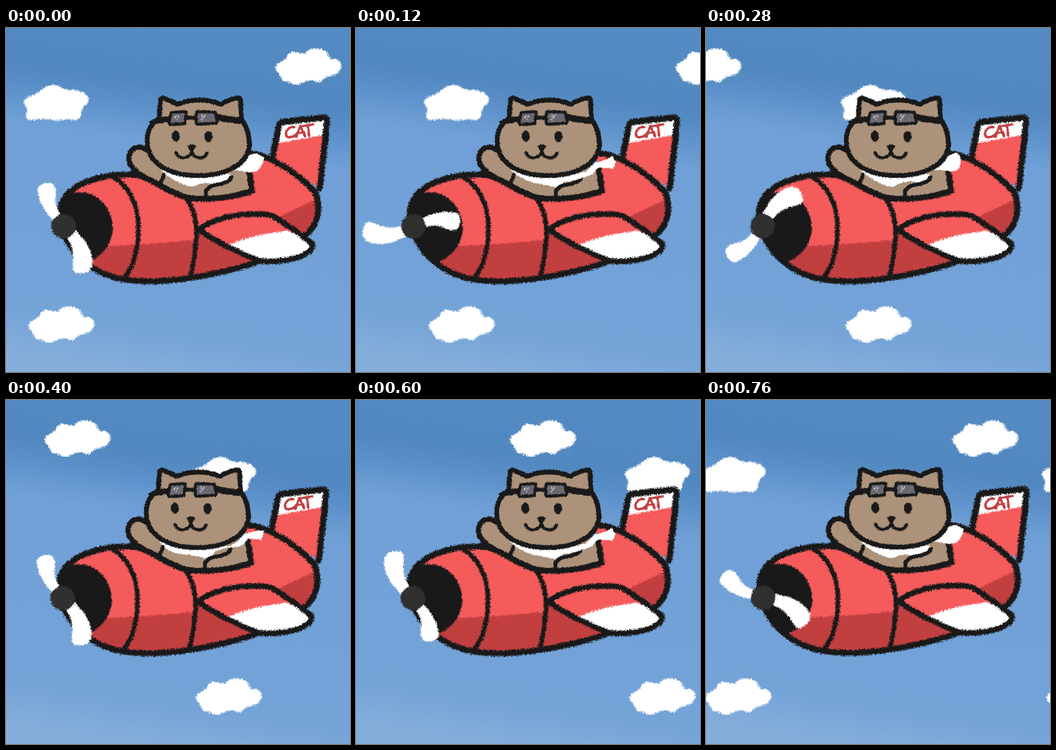
Write an HTML page with a canvas that moves like this. It is 748 by 748 pixels and loops after 0.8 s.

```html
<!DOCTYPE html>
<html lang="en">
<head>
<meta charset="utf-8">
<title>Cat pilot</title>
<style>
html, body { margin: 0; width: 100%; height: 100%; overflow: hidden; background: #70a0d7; }
canvas { display: block; }
</style>
</head>
<body>
<canvas id="stage" width="748" height="748"></canvas>
<script>
const SIZE = 748, STEP = 40, STEPS = 20;
const INK = '#191919', RED = '#f55b5b', DARK_RED = '#c23f40', FUR = '#ac927a', WHITE = '#fff';
const stage = document.getElementById('stage').getContext('2d');

function hash(x, y) {
  let h = Math.imul(x + 17, 374761393) ^ Math.imul(y + 71, 668265263);
  h = Math.imul(h ^ (h >>> 13), 1274126177);
  return ((h ^ (h >>> 16)) >>> 0) / 4294967296;
}

// Scatters pixels by up to amp so that edges look like crayon.
function roughen(ctx, amp) {
  const { width: w, height: h } = ctx.canvas;
  const image = ctx.getImageData(0, 0, w, h);
  const out = new Uint32Array(image.data.buffer);
  const src = out.slice();
  for (let y = 0; y < h; y++) {
    for (let x = 0; x < w; x++) {
      const gx = x * 0.7 | 0, gy = y * 0.7 | 0;
      const sx = Math.round(x + (hash(gx, gy) * 2 - 1) * amp);
      const sy = Math.round(y + (hash(gx + 999, gy) * 2 - 1) * amp);
      const inside = sx >= 0 && sy >= 0 && sx < w && sy < h;
      out[y * w + x] = inside ? src[sy * w + sx] : 0;
    }
  }
  ctx.putImageData(image, 0, 0);
}

function layer(w, h, amp, draw) {
  const canvas = document.createElement('canvas');
  canvas.width = w;
  canvas.height = h;
  const ctx = canvas.getContext('2d', { willReadFrequently: true });
  ctx.lineCap = ctx.lineJoin = 'round';
  draw(ctx);
  roughen(ctx, amp);
  return canvas;
}

function fill(ctx, d, color) {
  ctx.fillStyle = color;
  ctx.fill(new Path2D(d));
}

function line(ctx, d, width, color = INK) {
  ctx.strokeStyle = color;
  ctx.lineWidth = width;
  ctx.stroke(new Path2D(d));
}

function clipped(ctx, d, draw) {
  ctx.save();
  ctx.clip(new Path2D(d));
  draw();
  ctx.restore();
}

function oval(ctx, x, y, rx, ry, color = INK) {
  ctx.fillStyle = color;
  ctx.beginPath();
  ctx.ellipse(x, y, rx, ry, 0, 0, Math.PI * 2);
  ctx.fill();
}

// Closed smooth curve through the midpoints of a flat x, y list.
function blob(ctx, xy, dx, dy) {
  const n = xy.length / 2;
  const at = i => [xy[i % n * 2] + dx, xy[i % n * 2 + 1] + dy];
  const mid = i => {
    const [a, b] = [at(i), at(i + 1)];
    return [(a[0] + b[0]) / 2, (a[1] + b[1]) / 2];
  };
  ctx.beginPath();
  ctx.moveTo(...mid(0));
  for (let i = 1; i <= n; i++) ctx.quadraticCurveTo(...at(i), ...mid(i));
  ctx.fillStyle = WHITE;
  ctx.fill();
}

const PUFFY = [-2, 44, 6, 28, 20, 24, 30, 6, 48, 6, 62, 12, 72, -1, 100, -2, 114, 8, 116, 20, 137, 22,
  145, 36, 135, 56, 108, 60, 98, 74, 74, 66, 48, 79, 30, 73, 12, 66, 8, 52];
const FLAT = [-2, 38, 6, 25, 30, 19, 42, 5, 72, -3, 90, 12, 112, 10, 137, 19, 143, 36, 126, 50, 124, 69,
  116, 78, 94, 73, 72, 78, 40, 73, 7, 78, 3, 66, 8, 52];
const PAD = 8;
const cloudLayer = shape => layer(160, 96, 2.4, ctx => blob(ctx, shape, PAD, PAD));
const puffy = cloudLayer(PUFFY), flat = cloudLayer(FLAT);
const clouds = [[puffy, 586, 46], [flat, 39, 124], [puffy, 49, 607]];

const TAIL = 'M580 280 L593 212 Q595 206 603 204 L689 195 Q699 195 698 206 L682 349';
const COCKPIT = 'C310 313 340 357 402 370 C445 374 495 368 535 354 L527 307';
const HULL = 'M518 271 C575 272 640 323 668 352 C681 368 682 400 674 418 C668 434 660 443 652 450 ' +
  'L547 508 C500 526 400 549 320 551 C295 551 270 549 252 546 C200 536 160 506 138 472 ' +
  'C122 446 114 418 118 395 C122 350 185 319 262 319 ' + COCKPIT;
const WING = 'M420 438 C450 415 500 404 530 405 C550 404 572 404 582 410 C615 430 650 455 666 470 ' +
  'C670 480 655 490 640 497 C610 508 570 509 550 506 C510 490 450 462 420 438 Z';

const plane = layer(SIZE, SIZE, 2.4, ctx => {
  fill(ctx, TAIL, RED);
  clipped(ctx, TAIL, () => fill(ctx, 'M575 253 L720 228 V180 H575 Z', WHITE));
  line(ctx, TAIL, 13.5);
  fill(ctx, HULL, RED);
  clipped(ctx, HULL, () => {
    fill(ctx, 'M100 482 L228 474 L330 468 L411 461 L420 440 L597 409 L700 359 V600 H100 Z', DARK_RED);
    fill(ctx, 'M100 360 L148 358 C192 351 232 385 232 436 C230 475 205 500 176 509 L100 520 Z', INK);
    line(ctx, 'M234 324 C275 350 288 395 288 435 C288 480 278 515 260 540', 10);
    line(ctx, 'M394 372 C412 400 417 440 413 465 C411 500 405 525 400 542', 10);
  });
  line(ctx, HULL, 13);
  fill(ctx, WING, RED);
  clipped(ctx, WING, () => fill(ctx, 'M484 471 Q540 448 612 441 L690 470 V530 H530 Z', WHITE));
  line(ctx, WING, 12);
});

const lettering = layer(SIZE, SIZE, 0.8, ctx => {
  line(ctx, 'M627 216 C616 213 607 224 609 232 C611 240 622 238 630 232 ' +
    'M631 237 L640 213 L650 235 M633 228 L648 227 M645 213 L667 210 M657 212 L659 234', 5.2, DARK_RED);
});

// Four poses of the scarf: the part round the neck and the loose end.
const scarves = [
  ['M335 306 Q352 326 384 339 Q402 348 412 343 Q430 334 445 339 Q470 342 481 334 L488 318 Z',
    'M496 308 Q520 298 526 280 Q534 271 546 273 L562 282 Q558 302 546 311 Q535 316 520 313 Z'],
  ['M335 306 Q352 326 385 336 Q405 340 432 346 Q442 345 452 334 L490 318 Z',
    'M440 333 L460 324 L500 312 L521 292 Q540 288 548 285 L557 278 L565 291 L559 307 Q545 303 526 304 L514 318 Q490 329 455 335 Z'],
  ['M335 306 Q352 324 384 339 Q403 349 414 343 Q428 333 448 333 Q468 339 481 334 L488 318 Z',
    'M496 308 Q520 298 526 281 Q536 272 545 271 Q556 274 556 285 Q557 304 547 310 Q530 313 512 309 Z'],
  ['M335 306 Q350 329 376 334 Q410 337 440 345 Q448 343 457 329 L490 318 Z',
    'M484 321 L505 308 L521 291 Q540 285 564 283 L557 304 Q540 302 528 301 Q518 318 504 320 Z']
];

const HEAD = 'M333 196 L336 157 Q338 151 345 153 L373 166 Q420 147 467 166 Q485 155 503 152 ' +
  'Q510 151 510 160 L512 200 C525 215 529 235 529 255 C527 295 480 321 418 321 ' +
  'C355 321 307 295 307 245 C307 225 315 207 333 196 Z';

function drawBody(ctx, [collar, flap]) {
  const arm = 'M306 266 C292 252 267 260 267 283 C267 300 280 310 296 321';
  fill(ctx, arm + ' L330 339 Q365 362 402 370 C445 374 495 368 535 354 L525 300 L320 280 Z', FUR);
  line(ctx, arm, 11);
  line(ctx, 'M262 319 ' + COCKPIT, 12);
  fill(ctx, collar, WHITE);
  line(ctx, 'M343 320 Q341 329 335 337', 8);
  line(ctx, 'M434 365 C433 347 446 342 461 340 C476 338 486 333 490 325', 8.5);
  fill(ctx, flap, WHITE);
}

function drawGoggles(ctx) {
  line(ctx, 'M318 206 Q332 200 354 198', 12.5);
  line(ctx, 'M458 194 Q485 199 512 202', 14);
  line(ctx, 'M392 195 H414', 9);
  const lenses = ['M361 187 L389 185 L386 205 L358 207 Z', 'M417 185 L452 186 L456 204 L417 206 Z'];
  for (const lens of lenses) {
    line(ctx, lens, 13);
    fill(ctx, lens, '#6b6a73');
  }
  line(ctx, 'M366 196 L370 190 M371 199 L376 190 M425 200 L433 189 M424 194 L427 189', 1.6, '#e4e4e8');
}

function drawHead(ctx) {
  fill(ctx, HEAD, FUR);
  line(ctx, HEAD, 10.5);
  drawGoggles(ctx);
  oval(ctx, 369, 235, 9, 11.5);
  oval(ctx, 440, 236, 9, 11.5);
  fill(ctx, 'M395 258 Q396 253 404 253 Q412 253 413 258 Q411 265 404 268 Q397 265 395 258 Z', INK);
  line(ctx, 'M404 262 V270 M370 271 C374 286 397 286 404 270 C411 286 434 286 437 272', 7);
}

const cats = scarves.map(scarf => layer(SIZE, SIZE, 1.3, ctx => {
  drawBody(ctx, scarf);
  drawHead(ctx);
}));

const HUB = { x: 125, y: 431, r: 26.5 };
const PROP = 240;
const propeller = layer(PROP, PROP, 2, ctx => {
  ctx.translate(PROP / 2 - HUB.x, PROP / 2 - HUB.y);
  fill(ctx, 'M127 442 L135 460 Q149 482 146 506 Q143 527 150 532 Q162 536 178 530 ' +
    'Q190 521 188 504 Q184 480 173 465 L152 440 Z', WHITE);
  fill(ctx, 'M120 420 L118 404 Q106 388 108 368 Q111 346 102 339 Q90 334 76 341 ' +
    'Q66 348 70 360 Q73 380 84 394 L100 418 Z', WHITE);
  oval(ctx, HUB.x, HUB.y, HUB.r, HUB.r, '#303030');
});

function paintSky() {
  const sky = stage.createLinearGradient(429, 0, 319, SIZE);
  const stops = [[0, '#548ac2'], [0.18, '#5288c0'], [0.24, '#5a8fc8'], [0.29, '#6698d0'],
    [0.35, '#70a0d7'], [0.88, '#74a3d8'], [1, '#84adda']];
  for (const [at, color] of stops) sky.addColorStop(at, color);
  stage.fillStyle = sky;
  stage.fillRect(0, 0, SIZE, SIZE);
}

// Small sway of the whole plane: step, x, y.
const sway = [[0, 0, 0], [3, 0, 0], [7, -2, 0], [10, -2, 0], [13, -1, -2], [15, -1, 0], [19, -1, -1], [20, 0, 0]];
function swayAt(step) {
  const i = sway.findIndex(key => key[0] > step);
  const [a, b] = [sway[i - 1], sway[i]];
  const f = (step - a[0]) / (b[0] - a[0]);
  return [1, 2].map(j => Math.round(a[j] + (b[j] - a[j]) * f));
}

function render(step) {
  paintSky();
  for (const [image, x, y] of clouds) {
    stage.drawImage(image, x - PAD + 36.4 * step, y - PAD);
    if (step) stage.drawImage(image, x - PAD - 50.2 * (STEPS - step), y - PAD);
  }
  const pose = Math.round(step / STEPS * 6) % 6;
  stage.save();
  stage.translate(...swayAt(step));
  stage.drawImage(plane, 0, 0);
  stage.drawImage(lettering, 0, 0);
  stage.drawImage(cats[pose > 3 ? 6 - pose : pose], 0, 0);
  stage.translate(HUB.x, HUB.y);
  stage.rotate(step * Math.PI / 5);
  stage.drawImage(propeller, -PROP / 2, -PROP / 2);
  stage.restore();
}

const start = performance.now();
function tick(now) {
  render(Math.floor(Math.max(0, now - start) / STEP) % STEPS);
  requestAnimationFrame(tick);
}
render(0);
requestAnimationFrame(tick);
</script>
</body>
</html>
```
